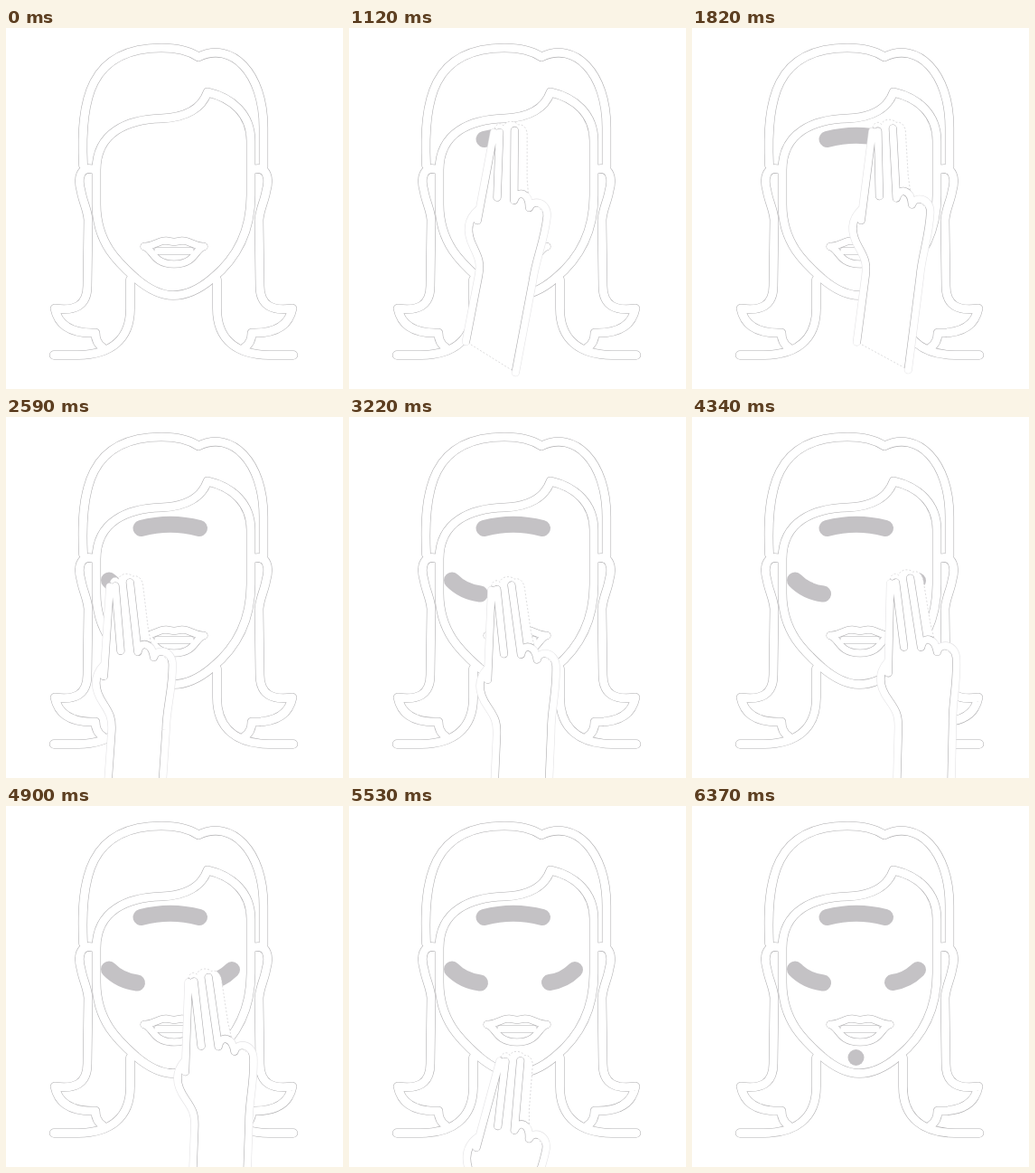
These frames come from a looping animation (373x399 px, 6.44 s). An HTML page:

```html
<!DOCTYPE html>
<html lang="en">
<head>
<meta charset="utf-8">
<title>Face cream steps</title>
<style>
  html, body { margin: 0; width: 100%; height: 100%; overflow: hidden; background: #fff; }
  svg { display: block; width: 100%; height: 100%; }
  .line { fill: none; stroke-linecap: round; stroke-linejoin: round; }
  .edge { stroke: #aeadaf; }
  .faint { stroke: #e4e3e5; }
  .core { stroke: #fff; }
  .face { stroke-width: 10.1; }
  .face.core { stroke-width: 9; }
  .lips { stroke-width: 8.6; }
  .lips.core { stroke-width: 7.5; }
  .arm { stroke-width: 9; }
  .arm.core { stroke-width: 7.8; }
  .mark { fill: none; stroke: #c4c2c5; stroke-width: 18; stroke-linecap: round; }
  .tips { fill: none; stroke: #d0cfd1; stroke-width: .7; stroke-dasharray: 2 2; }
</style>
</head>
<body>
<svg viewBox="0 0 373 399" preserveAspectRatio="none">
  <defs>
    <g id="side">
      <path d="M96 156C82 153 79 166 83 180C85 192 90 200 91 212L90 285C90 308 75 313 54 310C57 325 68 338 99 337C99 345 102 350 107 353"/>
      <path d="M53 361.500H80C115 361 137.500 345 137.500 310V278"/>
    </g>
    <g id="face">
      <path d="M85.500 152C82 80 92 22 172 22C190 22 204 26 213 32C250 14 285 50 285 110V154"/>
      <path d="M100 157C100 115 135 101 172 100C200 99 217 88 223 71C250 77 271 95 271 125V185C271 225 255 255 228 277C215 288 200 295.500 185 295.500C170 295.500 157 288 144 277C125 260 100 238 100 195Z"/>
      <use href="#side"/>
      <use href="#side" transform="matrix(-1 0 0 1 371 0)"/>
    </g>
    <g id="lips">
      <path d="M153 241.500C163 244 162 261 186 261C210 261 209 244 219 241.500"/>
      <path d="M153 241.500C166 241 168 235 177 235L186 236.500L195 235C204 235 206 241 219 241.500M168 246.300H204"/>
    </g>
    <path id="arm" d="M-6 1L-7 100M0 0L10 71M16 -5L29 71C31 58 44 60 47 76C49 66 66 66 68 82C70 110 64 130 65 155L64 258M-8 88C-18 100 -18 114 -6 130C2 141 5 146 5 160L4 234"/>
    <path id="palm" d="M-6 1C-8 -9 0 -12 3 -8C5 -15 14 -16 19 -12C24 -14 30 -10 31 0L39 45L44 64L68 82C70 110 64 130 65 155L64 258L4 234L5 160C5 146 2 141 -6 130C-18 114 -18 100 -8 88Z"/>
    <clipPath id="inside"><use href="#palm"/></clipPath>
  </defs>

  <use href="#face" class="line face edge"/>
  <use href="#face" class="line face core"/>
  <use href="#lips" class="line lips edge"/>
  <use href="#lips" class="line lips core"/>

  <path class="mark" pathLength="1" d="M149.500 123Q182 114.500 214 123"/>
  <path class="mark" pathLength="1" d="M114 180.500Q126 193 145 195.500"/>
  <path class="mark" pathLength="1" d="M250 181Q238 193 222 195"/>
  <path class="mark" pathLength="1" d="M181.500 278h.01"/>

  <g id="hand">
    <use href="#arm" class="line arm faint"/>
    <use href="#palm" fill="#fff"/>
    <use href="#palm" class="tips"/>
    <g clip-path="url(#inside)"><use href="#arm" class="line arm edge"/></g>
    <use href="#arm" class="line arm core"/>
  </g>
</svg>
<script>
  const LOOP = 6440, STEP = 70, ENTER = 140, LEAVE = 6300;
  const hand = document.getElementById('hand');
  const marks = [...document.querySelectorAll('.mark')];

  // Each wipe moves the hand (x, y, turn) evenly while its mark grows.
  const wipes = [
    { begin: 840, end: 1860, from: [151, 116, 11.5], to: [208, 114, 6.5] },
    { begin: 2240, end: 2940, from: [106, 177, 4], to: [136, 197, 2.5] },
    { begin: 3780, end: 4900, from: [243, 172, 0], to: [208, 194, 1.5] },
    { begin: 5600, end: 5740, from: [172, 285, 15], to: [172, 285, 15] }
  ];
  const entry = { end: ENTER, to: [30, 420, 16] };
  const exit = { begin: LEAVE, from: [98, 430, 15] };

  const clamp = v => Math.max(0, Math.min(1, v));
  const smooth = v => v * v * (3 - 2 * v);
  const span = (t, a, b) => clamp((t - a) / (b - a));
  const mix = (a, b, k) => a.map((v, i) => v + (b[i] - v) * k);

  function poseAt(t) {
    const now = wipes.find(w => t >= w.begin && t <= w.end);
    if (now) return mix(now.from, now.to, span(t, now.begin, now.end));
    const next = wipes.find(w => w.begin > t) || exit;
    const last = wipes.filter(w => w.end < t).pop() || entry;
    return mix(last.to, next.from, smooth(span(t, last.end, next.begin)));
  }

  function draw(ms) {
    const t = Math.floor((ms % LOOP) / STEP) * STEP;
    const [x, y, turn] = poseAt(t);
    hand.style.display = t >= ENTER && t < LEAVE ? '' : 'none';
    hand.setAttribute('transform', `translate(${x} ${y}) rotate(${turn})`);
    wipes.forEach(({ begin, end }, i) => {
      const k = span(t, begin, end);
      marks[i].style.display = k > 0 ? '' : 'none';
      marks[i].style.strokeDasharray = k < 1 ? `${k} 2` : 'none';
    });
  }

  const start = performance.now();
  function tick() {
    draw(performance.now() - start);
    requestAnimationFrame(tick);
  }
  tick();
</script>
</body>
</html>
```
